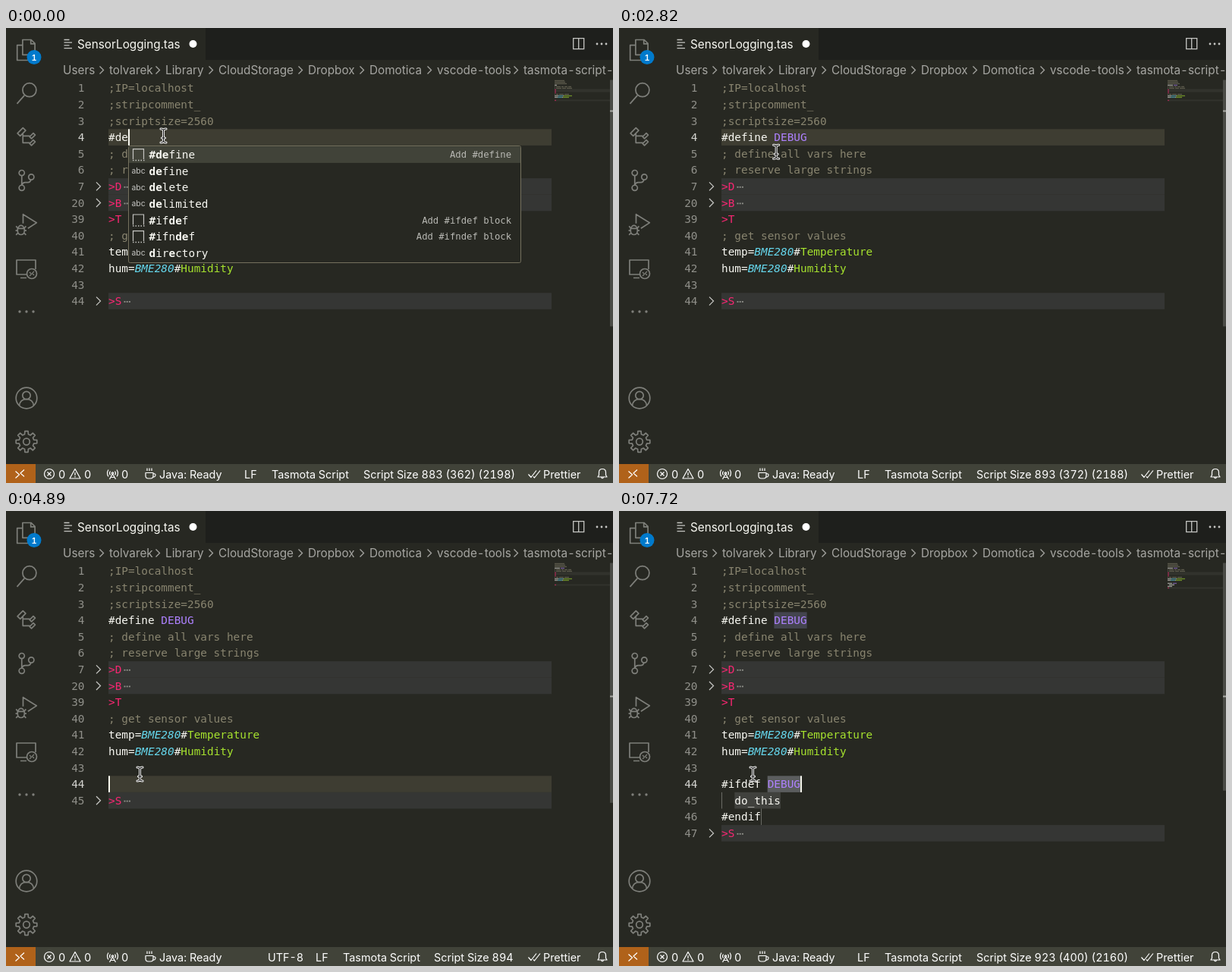
An HTML page that plays this animation: 800x600 px, repeating every 8 s.

```html
<!DOCTYPE html>
<html lang="en">
<head>
<meta charset="utf-8">
<title>Script editor</title>
<style>
html, body { margin: 0; width: 100%; height: 100%; overflow: hidden; background: #272822; }
svg { display: block; width: 100vw; height: 100vh; }
text { white-space: pre; }
.ui { font-family: Inter, "Open Sans", sans-serif; font-variant-numeric: tabular-nums; }
.code { font: 14.4px "DejaVu Sans Mono", monospace; }
.tab { font-size: 15.3px; }
.bar { font-size: 14.4px; fill: #fff; }
.icon { fill: none; stroke: #7e7f7a; stroke-width: 1.7; stroke-linejoin: round; }
.icon path, .icon circle { vector-effect: non-scaling-stroke; }
.tool { fill: none; stroke: #c5c5c2; stroke-width: 1.3; }
.white { fill: none; stroke: #fff; stroke-width: 1.2; stroke-linejoin: round; }
</style>
</head>
<body>
<svg viewBox="0 0 800 600">
  <defs>
    <path id="beam" d="M-3.500-9q3.500 0 3.500 2.500 0-2.500 3.500-2.500M-3.500 9q3.500 0 3.500-2.500 0 2.500 3.500 2.500M0-6.500V6.500M-2 3h4"/>
  </defs>
  <rect width="800" height="600" fill="#272822"/>
  <rect x="263" width="537" height="42" fill="#1e1f1c"/>

  <g class="icon">
    <g transform="translate(12.600 14.600) scale(1.200)">
      <path d="M7.750.750h9.400l4.100 4.100v12.400H7.750zM16.750 1v4.250h4.500M7.750 6.750h-6v16.500h13.500v-6"/>
    </g>
    <g transform="translate(12.600 71.800) scale(1.200)">
      <circle cx="15.250" cy="8.250" r="7.500"/><path d="M9.700 14.200 1.600 23.400"/>
    </g>
    <g transform="translate(12.600 129.100) scale(1.800)">
      <path d="M1.400 5.400l4-4 2 2-4 4zM5.350 5.600v6.750H10.500M5.350 7.350H10.500M10.300 8l2.700-2.700 1.350 1.350-2.700 2.700zM10.300 13l2.700-2.700 1.350 1.350-2.700 2.700z"/>
    </g>
    <g transform="translate(12.600 186.600) scale(1.200)">
      <circle cx="6.800" cy="3.750" r="3"/><circle cx="17.250" cy="8.250" r="3"/><circle cx="6.800" cy="20.200" r="3"/>
      <path d="M6.800 6.750V17M17 11.250q-.900 3-3.500 3h-3q-2.700 0-3.500 2.700"/>
    </g>
    <g transform="translate(12.600 244.600) scale(1.200)">
      <path d="M8.250 11V.900l14.800 9.300-9.500 6.200M3 16.200a3 3 0 0 1 6 0M2.250 16.500h7.500v3q-.500 3.750-3.750 3.750t-3.750-3.750z"/>
      <path d="M.500 14l2 2M11.500 14l-2 2M0 18.750h2.250M9.750 18.750H12M.500 23.500l2-2M11.500 23.500l-2-2"/>
    </g>
    <path d="M27 325H14V306h25v12M19 329.500h8"/><circle cx="34" cy="324" r="6.500"/>
    <path d="M31 322l2.500 2.500L31 327M37 321l-2.500 2.500 2.500 2.500" stroke-width="1.200"/>
    <circle cx="27" cy="488" r="13.800"/><circle cx="27" cy="484.500" r="5.200"/>
    <path d="M17.500 498q1-8.500 9.500-8.500t9.500 8.500"/>
    <path id="gear"/><circle cx="27" cy="545.500" r="4.300"/>
  </g>
  <g fill="#7e7f7a"><circle cx="18" cy="374" r="1.700"/><circle cx="27" cy="374" r="1.700"/><circle cx="36" cy="374" r="1.700"/></g>
  <circle cx="37" cy="38.500" r="9.500" fill="#007acc"/>
  <text class="ui" x="37" y="42.500" font-size="11" font-weight="600" fill="#fff" text-anchor="middle">1</text>

  <path d="M76.500 15.500h7M76.500 19.200h10.500M76.500 22.900h7M76.500 26.600h10.500" class="tool"/>
  <text class="ui tab" x="94" y="26.500" fill="#f8f8f2">SensorLogging.tas</text>
  <circle cx="246.500" cy="21" r="5" fill="#fff"/>
  <path class="tool" d="M747.700 13.700h14v14h-14zM754.700 13.700v14"/>
  <g fill="#c5c5c2"><circle cx="779" cy="21" r="1.400"/><circle cx="785" cy="21" r="1.400"/><circle cx="791" cy="21" r="1.400"/></g>
  <g id="crumbs" class="ui tab" fill="#a6a6a2"></g>

  <g id="editor"></g>

  <rect y="575" width="800" height="25" fill="#414339"/>
  <rect y="575" width="39" height="25" fill="#b0621a"/>
  <g class="white">
    <path d="M12.500 584.500l5 4.500-5 4.500M24 582.500l-5 4.500 5 4.500"/>
    <circle cx="57" cy="588" r="6.500"/><path d="M54.500 585.500l5 5M59.500 585.500l-5 5"/>
    <path d="M91 581.500l7 12.500H84zM91 586v4M91 591v1.500"/>
    <path d="M140.500 588l-4 7M140.500 588l4 7M138 592.500h5M137.500 584.500q-2 2.500 0 5M143.500 584.500q2 2.500 0 5M135 582.500q-3 4.500 0 9M146 582.500q3 4.500 0 9"/>
    <circle cx="140.500" cy="587" r="1.200"/>
    <path d="M184 586.500h10v4q0 3.500-3.500 3.500h-3q-3.500 0-3.500-3.500zM194 587.500q3.500 0 3 2.500t-3.500 2M186 580.500v3.500M189 580.500v3.500M192 580.500v3.500"/>
    <path d="M688.500 588.500l3.500 4 7-9M695 591.500l1.500 1.500 7.500-9.500"/>
    <path d="M780 592h12l-1.500-2.500V586q0-4.500-4.500-4.500t-4.500 4.500v3.500zM784.500 592.500q1.500 2.500 3 0"/>
  </g>
  <g class="ui bar">
    <text x="69" y="593.500">0</text><text x="103" y="593.500">0</text><text x="152" y="593.500">0</text>
    <text x="202" y="593.500">Java: Ready</text><text x="708" y="593.500">Prettier</text>
  </g>
  <g id="status" class="ui bar"></g>

  <g id="mouse" fill="none" stroke-linecap="round">
    <use href="#beam" stroke="#fff" stroke-width="3"/>
    <use href="#beam" stroke="#111" stroke-width="1.100"/>
  </g>
</svg>
<script>
const LOOP = 8000, LEFT = 135, TOP = 68.5, ROW = 21.6, CHAR = 8.669, VIEW = 505.5;
const $ = id => document.getElementById(id);
const colors = { c: '#88846f', w: '#f8f8f2', k: '#f92672', v: '#ae81ff', n: '#66d9ef', g: '#a6e22e' };

// A token is a colour key followed by its text.
const head = [[1, 'c;IP=localhost'], [2, 'c;stripcomment_'], [3, 'c;scriptsize=2560']];
const body = [
  [5, 'c; define all vars here'], [6, 'c; reserve large strings'],
  [7, 'k>D'], [20, 'k>B'], [39, 'k>T'], [40, 'c; get sensor values'],
  [41, 'wtemp=', 'nBME280', 'w#', 'gTemperature'],
  [42, 'whum=', 'nBME280', 'w#', 'gHumidity'], [43]
];

// Menu entries: asterisks wrap matched letters, a detail follows the bar.
const DEF = '|Add #define', IFDEF = '|Add #ifdef block', IFNDEF = '|Add #ifndef block';
const menus = {
  de: ['*#de*fine' + DEF, '*de*fine', '*de*lete', '*de*limited', '*#*if*de*f' + IFDEF, '*#*ifn*de*f' + IFNDEF, '*d*ir*e*ctory'],
  def: ['*#def*ine' + DEF, '*def*ine', '*#*if*def*' + IFDEF, '*#*ifn*def*' + IFNDEF],
  hash: ['*#*define' + DEF, '*#*ifdef' + IFDEF, '*#*ifndef' + IFNDEF],
  i: ['*#i*fdef' + IFDEF, '*#i*fndef' + IFNDEF, '*#*def*i*ne' + DEF],
  if: ['*#if*def' + IFDEF, '*#if*ndef' + IFNDEF, '*if*', '*if*|Create a multiline if-then-else',
    '*if*|Create an inline if-then-else', '*#*de*fi*ne' + DEF]
};

// Each step overrides part of the state from its time on.
const on = { caret: 1 }, off = { caret: 0 }, ready = { busy: 0 };
const steps = [
  [0, { def: ['w#de'], tail: [], row: 3, col: 3, caret: 1, sel: null, menu: 'de', size: 883, cut: 521, busy: 0 }],
  [140, { def: ['w#def'], col: 4, menu: 'def', size: 884, busy: 1 }],
  [290, ready],
  [590, { def: ['w#define ', 'vDEBUG'], col: 13, sel: 8, menu: null, size: 893, busy: 1 }],
  [740, ready], [1040, off], [1630, on], [2080, off],
  [2230, { caret: 1, sel: null }],
  [2680, off], [3270, on], [3710, off],
  [4000, { row: 12, col: 0, caret: 1 }],
  [4450, off],
  [4890, { row: 13, tail: [[]], caret: 1, size: 894, busy: 1 }],
  [5040, ready], [5490, off],
  [5780, { tail: [['w#']], col: 1, caret: 1, size: 895, busy: 1 }],
  [5930, { menu: 'hash' }], [6080, ready],
  [6380, { tail: [['w#i']], col: 2, menu: 'i', size: 896, busy: 1 }],
  [6530, { tail: [['w#', 'kif']], col: 3, menu: 'if', size: 897 }],
  [6680, ready], [7120, off],
  [7570, { tail: [['w#ifdef ', 'vDEBUG'], ['w  do_this'], ['w#endif']], col: 12, sel: 7,
    caret: 1, menu: null, size: 923, cut: 523, busy: 1 }],
  [7720, ready]
];

const rowY = i => TOP + i * ROW;
const colX = n => LEFT + n * CHAR;
const rect = (x, y, w, h, fill, extra = '') =>
  `<rect x="${x}" y="${y}" width="${w}" height="${h}" fill="${fill}" ${extra}/>`;
const text = (x, y, str, attrs = '') => `<text x="${x}" y="${y}" ${attrs}>${str}</text>`;
const safe = str => str.replace(/>/g, '&gt;');
const block = (row, from, to, fill) => rect(colX(from), rowY(row), (to - from) * CHAR, ROW, fill);
const isFold = tok => /^k>[DBS]/.test(tok || '');

function drawLine([no, ...toks], i, active) {
  const mid = rowY(i) + ROW / 2, base = mid + 5;
  let out = '';
  if (isFold(toks[0])) {
    out += rect(LEFT, rowY(i), 584, ROW, '#353634');
    out += `<path d="M119 ${mid - 5.5}l5.500 5.500-5.500 5.500" fill="none" stroke="#c5c5c2" stroke-width="1.300"/>`;
    for (const x of [156.5, 159.7, 162.9]) out += rect(x - 1, mid, 2, 1.8, '#8f908a');
  }
  out += text(103.5, base, no, `text-anchor="end" fill="${active ? '#d6d6d2' : '#90908a'}"`);
  const spans = toks.map(t => `<tspan fill="${colors[t[0]]}"${t[0] === 'n' ? ' font-style="italic"' : ''}>${safe(t.slice(1))}</tspan>`);
  return out + text(LEFT, base, spans.join(''));
}

function drawMini(lines) {
  let out = '';
  lines.forEach(([, ...toks], i) => {
    let col = 0;
    const y = TOP + i * 2;
    if (isFold(toks[0])) out += rect(723, y, 73, 2, '#fff', 'opacity=".05"');
    for (const t of toks) {
      for (const m of t.slice(1).matchAll(/\S+/g))
        out += rect(723 + col + m.index, y + .3, m[0].length, 1.3, colors[t[0]], 'opacity=".55"');
      col += t.length - 1;
    }
  });
  return out;
}

function drawMenu(items, row, col) {
  const x = colX(col) + .5, y = rowY(row + 1) + .6;
  let out = rect(x, y, 517, Math.ceil(items.length * ROW + 2.6), '#272822', 'stroke="#75715e" rx="2"');
  out += rect(x + .5, y + .8, 516, ROW, '#414339');
  items.forEach((item, i) => {
    const [label, detail] = item.split('|'), mid = y + .8 + (i + .5) * ROW;
    const spans = label.split('*').map((s, k) => k % 2 ? `<tspan font-weight="bold">${s}</tspan>` : s);
    out += text(x + 27, mid + 5, spans.join(''), 'fill="#f8f8f2"');
    if (detail) {
      out += `<path d="M${x + 6} ${mid + 6}v-13.500h14v13.500" fill="none" stroke="#c5c5c2" stroke-width="1.200"/>`
        + `<path d="M${x + 5.5} ${mid + 7.5}h15.500" stroke="#c5c5c2" stroke-width="1.500" stroke-dasharray="1.500 2"/>`
        + text(x + 504.5, mid + 4.3, detail, 'text-anchor="end" fill="#b9b9b4" style="font-size:12.24px"');
    } else {
      out += text(x + 4, mid + 3.5, 'abc', 'class="ui" fill="#c5c5c2" style="font-size:10.4px"');
    }
  });
  return out;
}

function drawEditor(s) {
  const lines = [...head, [4, ...s.def], ...body, ...s.tail.map((toks, i) => [44 + i, ...toks])];
  lines.push([44 + s.tail.length, 'k>S']);
  let out = '';
  if (s.sel === null) out += rect(LEFT, rowY(s.row), 584, ROW, '#3e3d32');
  else out += block(s.row, s.sel, s.col, '#5b5d5e');
  if (s.tail.length > 1) {
    out += block(3, 8, 13, '#43444e') + block(14, 2, 9, '#40413d');
    out += rect(LEFT, rowY(14), 1, ROW, '#6a6b65') + rect(colX(6), rowY(15), 1, ROW, '#6a6b65');
  }
  out += lines.map((line, i) => drawLine(line, i, i === s.row)).join('');
  if (s.caret) out += rect(colX(s.col), rowY(s.row), 2, ROW, '#f8f8f0');
  out += drawMini(lines);
  const total = VIEW + (lines.length - 1) * ROW;
  out += rect(796, TOP, 4, VIEW * VIEW / total, '#4b4c47');
  out += rect(796, TOP - .5 + s.row * 13.5, 4, 2, '#a9a9a5');
  if (s.menu) out += drawMenu(menus[s.menu], s.row, s.col);
  return `<g class="code">${out}</g>`;
}

function drawStatus({ size, cut, busy }) {
  const used = size - cut;
  const items = busy
    ? [[345, 'UTF-8'], [408, 'LF'], [444, 'Tasmota Script'], [564, `Script Size ${size}`]]
    : [[314, 'LF'], [350, 'Tasmota Script'], [471, `Script Size ${size} (${used}) (${2560 - used})`]];
  return items.map(([x, str]) => text(x, 593.5, str)).join('');
}

// The pointer glides down in ten eased jumps.
function mouseAt(t) {
  const n = Math.floor((t - 2530) / 146.6) + 1;
  const u = Math.min(Math.max(n / 10, 0), 1), p = u * u * (3 - 2 * u);
  return [207.5 - 31 * p * p, 142 + 205 * p];
}

function drawStatic() {
  let d = '';
  for (let k = 0; k < 8; k++) {
    for (const [turn, r] of [[-.24, 10], [-.15, 14], [.15, 14], [.24, 10]]) {
      const a = k * Math.PI / 4 + turn;
      d += `${d ? 'L' : 'M'}${(27 + r * Math.cos(a)).toFixed(1)} ${(545.5 + r * Math.sin(a)).toFixed(1)}`;
    }
  }
  $('gear').setAttribute('d', d + 'z');
  const crumbs = [[75, 'Users'], [136, 'tolvarek'], [210, 'Library'], [280, 'CloudStorage'], [398, 'Dropbox'],
    [479, 'Domotica'], [568, 'vscode-tools'], [682, 'tasmota-script-s']];
  $('crumbs').innerHTML = crumbs.map(([x, str], i) => text(x, 60.5, str) + (i
    ? `<path d="M${x - 12.5} 50.500l5 5-5 5" fill="none" stroke="#a6a6a2" stroke-width="1.300"/>` : '')).join('');
}

let shown = -1;
function update(now) {
  const t = now % LOOP;
  const past = steps.filter(([at]) => at <= t);
  if (past.length !== shown) {
    shown = past.length;
    const state = Object.assign({}, ...past.map(step => step[1]));
    $('editor').innerHTML = drawEditor(state);
    $('status').innerHTML = drawStatus(state);
  }
  $('mouse').setAttribute('transform', `translate(${mouseAt(t).join(' ')})`);
}

drawStatic();
const start = performance.now();
update(0);
requestAnimationFrame(function tick() {
  update(performance.now() - start);
  requestAnimationFrame(tick);
});
</script>
</body>
</html>
```
